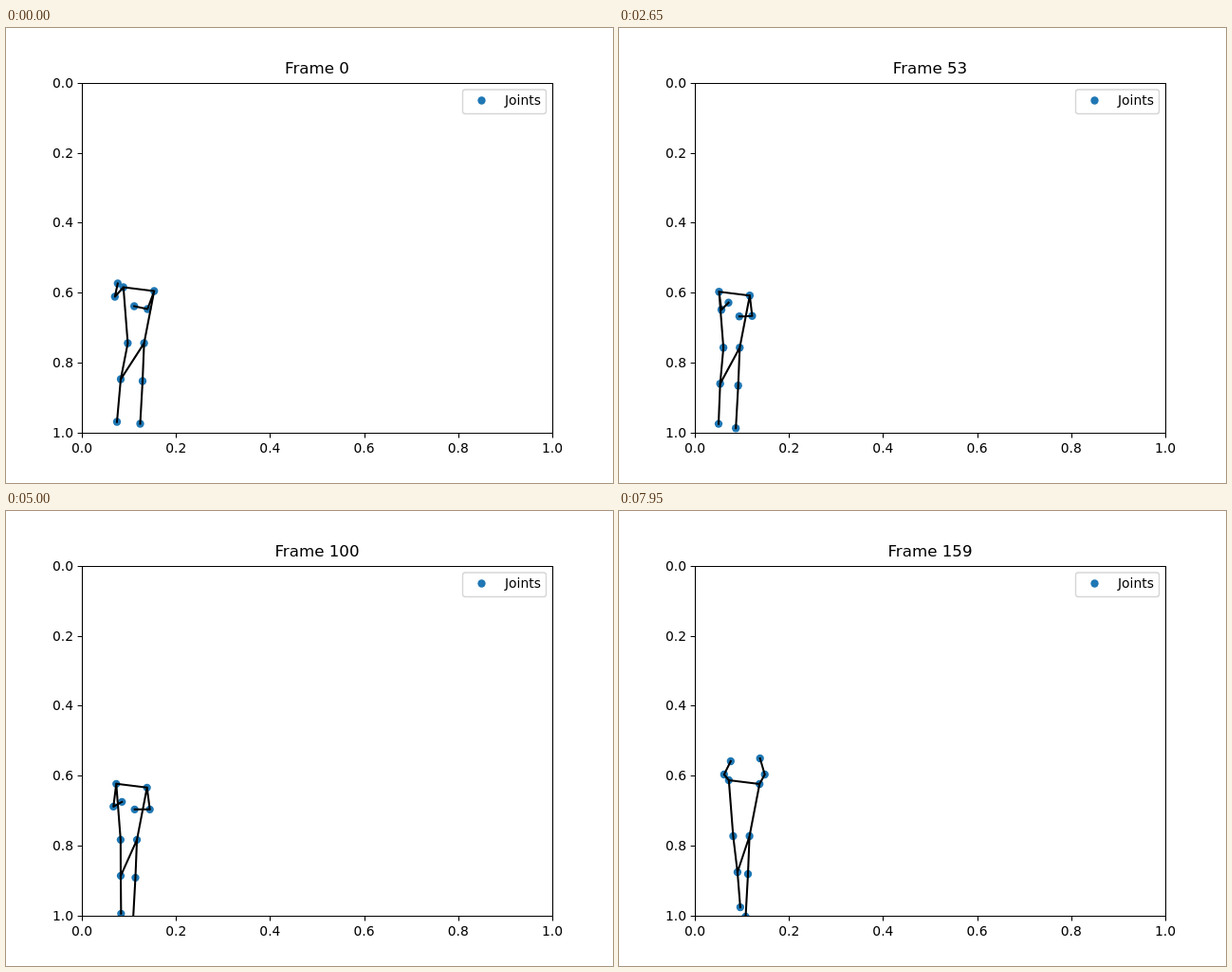
Write an HTML page that moves like this. It is 640x480 px and loops after 8 s.

```html
<!DOCTYPE html>
<html lang="en">
<head>
<meta charset="utf-8">
<title>Joint plot</title>
<style>
  html, body { margin: 0; width: 100%; height: 100%; overflow: hidden; background: #fff; }
  svg { display: block; width: 640px; height: 480px; }
  text { font: 13.89px "DejaVu Sans", sans-serif; fill: #000; }
  #title { font-size: 16.67px; text-anchor: middle; }
  #axes { fill: none; stroke: #000; stroke-width: 1.11; }
  #bones { fill: none; stroke: #000; stroke-width: 2.08; stroke-linecap: square; stroke-linejoin: round; }
  circle { fill: #1f77b4; r: 4.17px; }
  .x { text-anchor: middle; }
  .y { text-anchor: end; }
</style>
</head>
<body>
<svg viewBox="0 0 640 480">
  <clipPath id="plot"><rect x="80" y="57.6" width="496" height="369.6"/></clipPath>
  <g clip-path="url(#plot)">
    <g id="dots"></g>
    <path id="bones"/>
  </g>
  <path id="axes"/>
  <g id="labels"></g>
  <text id="title" x="328" y="48.4"></text>
  <rect x="481.5" y="65" width="88" height="25.5" rx="2.8" fill="#fff" fill-opacity=".8" stroke="#ccc" stroke-opacity=".8" stroke-width="1.39"/>
  <circle cx="501.5" cy="76.5"/>
  <text x="526" y="81">Joints</text>
</svg>
<script>
const LOOP = 8000, STEP = 50;
const byId = id => document.getElementById(id);
const mix = (a, b, u) => a + (b - a) * u;

function add(parent, tag, attrs, text = '') {
  const el = document.createElementNS('http://www.w3.org/2000/svg', tag);
  for (const key in attrs) el.setAttribute(key, attrs[key]);
  el.textContent = text;
  parent.append(el);
  return el;
}

// Arm poses: elbow from shoulder, then wrist from elbow.
const guard = { elbowL: [-9, 10], wristL: [3, -14], elbowR: [-7, 19], wristR: [-14, -3] };
const tucked = { elbowL: [8, 14], wristL: [6, -10], elbowR: [2, 20], wristR: [-11, 1] };
const lowered = { elbowL: [-3, 24], wristL: [9, -5], elbowR: [3, 23], wristR: [-16, 0] };
const raised = { elbowL: [-5, -6], wristL: [7, -14], elbowR: [5.5, -10], wristR: [-5, -17] };

// The middle of the shoulders at a few key moments.
const keys = [
  { at: 0, x: 140, y: 275.5, arms: guard },
  { at: 1800, x: 124, y: 274, arms: tucked },
  { at: 3500, x: 134.5, y: 286.5, arms: lowered },
  { at: 4300, x: 140, y: 287.5, arms: lowered },
  { at: 5650, x: 137, y: 292, arms: lowered },
  { at: 6750, x: 126, y: 290, arms: raised },
  { at: 7950, x: 132, y: 286, arms: raised }
];

const chains = [
  'wristL elbowL shoulderL shoulderR elbowR wristR',
  'shoulderL hipL kneeL ankleL',
  'shoulderR hipR kneeR ankleR',
  'kneeL hipR'
].map(chain => chain.split(' '));

const dots = {};
for (const name of new Set(chains.flat())) dots[name] = add(byId('dots'), 'circle', {});

function poseAt(time) {
  const next = Math.max(1, keys.findIndex(key => key.at >= time));
  const a = keys[next - 1], b = keys[next];
  const span = b.at - a.at, u = (time - a.at) / span;
  // Between key moments the body sways left, further when there is more time.
  const x = mix(a.x, b.x, u) - span / 225 * Math.sin(Math.PI * u) ** 2;
  const y = mix(a.y, b.y, u);
  const reach = (from, name) => from.map((v, i) => v + mix(a.arms[name][i], b.arms[name][i], u));

  const shoulderL = [x - 16.2, y - 2], shoulderR = [x + 16.2, y + 2];
  const elbowL = reach(shoulderL, 'elbowL'), elbowR = reach(shoulderR, 'elbowR');
  // The left leg slowly draws in under the hips.
  const p = time / LOOP, hipX = x - 3, hipY = y + 57;
  return {
    shoulderL, shoulderR, elbowL, elbowR,
    wristL: reach(elbowL, 'wristL'), wristR: reach(elbowR, 'wristR'),
    hipL: [hipX - 8.6, hipY], hipR: [hipX + 8.6, hipY],
    kneeL: [hipX + mix(-16, -4, p), hipY + 38], kneeR: [hipX + 7, hipY + 40],
    ankleL: [hipX + mix(-20, -1, p), hipY + mix(83, 75, p)], ankleR: [hipX + 4.5, hipY + 85]
  };
}

function drawAxes() {
  let d = 'M80.5 58.5H576.5V427.5H80.5Z';
  for (let i = 0; i <= 5; i++) {
    const x = 80 + 99.2 * i, y = 57.6 + 73.92 * i;
    const label = (i / 5).toFixed(1);
    d += `M${Math.round(x) + .5} 427.5v4.9M80.5 ${Math.round(y) + .5}h-4.9`;
    add(byId('labels'), 'text', { class: 'x', x, y: 447.5 }, label);
    add(byId('labels'), 'text', { class: 'y', x: 71, y: y + 5 }, label);
  }
  byId('axes').setAttribute('d', d);
}

function draw(count) {
  const pose = poseAt(count * STEP);
  for (const name in dots) {
    dots[name].setAttribute('cx', pose[name][0]);
    dots[name].setAttribute('cy', pose[name][1]);
  }
  byId('bones').setAttribute('d',
    chains.map(chain => 'M' + chain.map(name => pose[name].join(' ')).join('L')).join(''));
  byId('title').textContent = 'Frame ' + count;
}

const start = performance.now();
function tick() {
  draw(Math.floor((performance.now() - start) % LOOP / STEP));
  requestAnimationFrame(tick);
}
drawAxes();
tick();
</script>
</body>
</html>
```
